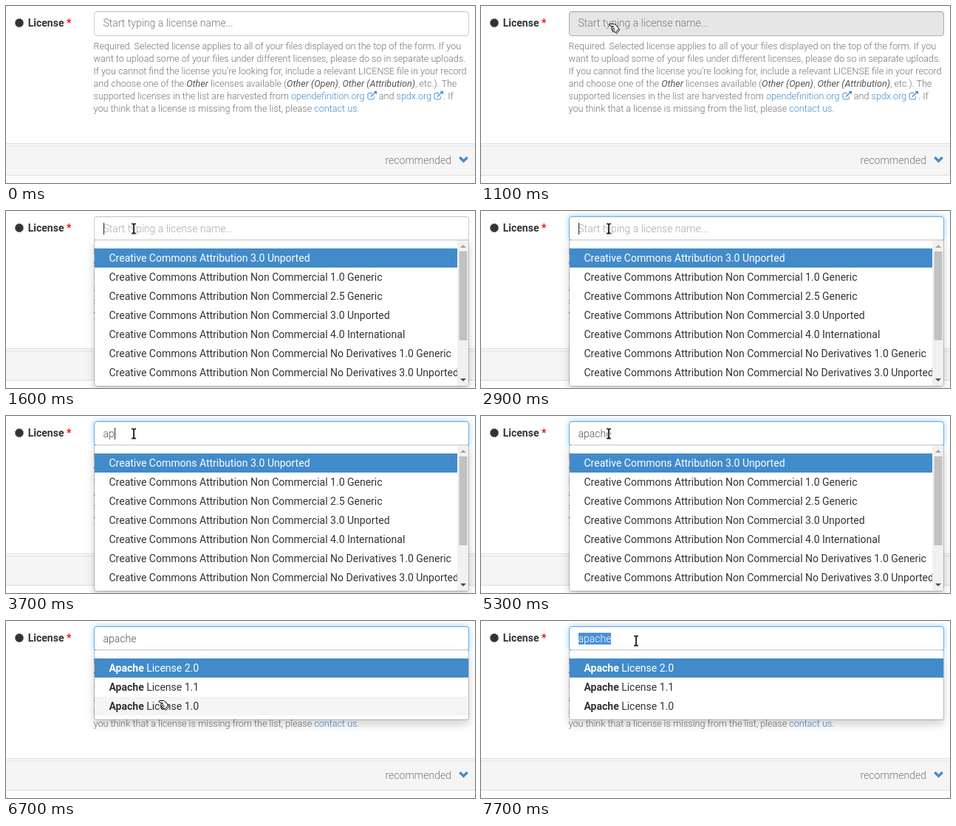
Write an HTML page that moves like this. It is 635x241 px and loops after 8 s.

```html
<!DOCTYPE html>
<html lang="en">
<head>
<meta charset="utf-8">
<title>License picker</title>
<style>
html, body { margin: 0; width: 635px; height: 241px; overflow: hidden; background: #fff; }
body { position: relative; font: 300 14px/20px Roboto, sans-serif; color: #333; }
body > * { position: absolute; box-sizing: border-box; white-space: nowrap; }
svg { display: block; overflow: visible; }
a { color: #428bca; }

/* Every animated part shares one 8 s clock; percent = ms / 80. */
.anim { animation: 8s step-end infinite; }

.label { left: 29.7px; top: 13px; font-weight: 700; }
.label i { color: #f00; font-style: normal; margin-left: 3.5px; }
.help { left: 118.5px; top: 46px; font-size: 12.6px; line-height: 17px; color: #737373; }
.help em { font-weight: 400; color: #555; }
.help svg { display: inline-block; vertical-align: -1px; }
.rule { left: 0; top: 187px; width: 635px; height: 1px; background: #ddd; box-shadow: 0 1px 1px rgba(0,0,0,.05); }
.bar { left: 0; top: 190px; width: 635px; height: 41px; background: #f5f5f5; border: solid #ddd; border-width: 1px 0; }
.more { left: 513.5px; top: 200px; color: #777; }

.box { left: 118.5px; top: 7px; width: 508px; height: 34px; padding: 5px 12px; border: 1px solid #ccc; border-radius: 4px; background: #fff; box-shadow: inset 0 1px 1px rgba(0,0,0,.075); color: #777; }
.button { animation-name: hover; }
.field { padding-top: 6px; opacity: 0; color: #555; animation-name: focus; }
.hint { position: absolute; color: #aaa; animation-name: hint; }
.typed { display: inline-block; height: 16px; line-height: 16px; margin-top: 2px; animation-name: select; }
.typed b { font-weight: 300; opacity: 0; }
.caret { left: 132px; top: 16px; width: 1px; height: 16px; background: #222; opacity: 0; animation-name: caret; }

.menu { left: 118.5px; top: 39px; width: 508px; padding: 11px 0 5px; overflow: hidden; border: 1px solid rgba(0,0,0,.2); border-radius: 0 0 4px 4px; background: #fff padding-box; box-shadow: 0 6px 12px rgba(0,0,0,.175); font-weight: 400; opacity: 0; }
.menu p { margin: 0; padding: 3px 20px; }
.menu p:first-child { background: #428bca; color: #fff; }
.menu b { font-weight: 700; }
.long { height: 200px; padding-right: 15px; animation-name: long; }
.short { animation-name: short; }
.row2 { animation-name: row2; }
.row3 { animation-name: row3; }
.scroll { position: absolute; right: 0; top: 0; }

.hand, .beam { left: 0; top: 0; opacity: 0; }
.hand { animation-name: hand; }
.beam { translate: 169px 16.5px; animation-name: beam; }

@keyframes hover { 10% { background: #e6e6e6; border-color: #adadad; } 18.75% { opacity: 0; } }
@keyframes focus {
  18.75% { opacity: 1; }
  21.25% { opacity: 1; border-color: #9dbfdc; box-shadow: inset 0 1px 1px rgba(0,0,0,.075), 0 0 5px rgba(102,175,233,.3); }
  22.5%, to { opacity: 1; border-color: #66afe9; box-shadow: inset 0 1px 1px rgba(0,0,0,.075), 0 0 8px rgba(102,175,233,.6); }
}
@keyframes hint { 43.75%, to { opacity: 0; } }
@keyframes key1 { 43.75%, to { opacity: 1; } }
@keyframes key2 { 46.25%, to { opacity: 1; } }
@keyframes key3 { 47.5%, to { opacity: 1; } }
@keyframes key4 { 52.5%, to { opacity: 1; } }
@keyframes key5 { 56.25%, to { opacity: 1; } }
@keyframes key6 { 58.75%, to { opacity: 1; } }
@keyframes select { 96.25%, to { background: #4a90d9; color: #fff; } }
@keyframes caret {
  18.75%, 36.25% { opacity: 1; left: 132px; }
  27.5% { opacity: 0; left: 132px; }
  43.75% { opacity: 1; left: 139px; }
  46.25% { opacity: 1; left: 147px; }
  47.5% { opacity: 1; left: 155px; }
  52.5% { opacity: 1; left: 162px; }
  56.25% { opacity: 1; left: 170px; }
  58.75%, 72.5%, 87.5% { opacity: 1; left: 177px; }
  66.25%, 80%, 96.25% { opacity: 0; left: 177px; }
}
@keyframes long { 18.75% { opacity: 1; } 71.25%, to { opacity: 0; } }
@keyframes short { 71.25%, to { opacity: 1; } }
@keyframes row2 { 81.25%, 88.75% { background: #f5f5f5; } 83.75%, 90% { background: #fff; } }
@keyframes row3 { 83.75% { background: #f5f5f5; } 88.75% { background: #fff; } }
@keyframes hand {
  5% { opacity: 1; translate: 0 112px; }
  6.25% { opacity: 1; translate: 62px 92px; }
  7.5% { opacity: 1; translate: 115px 66px; }
  8.75% { opacity: 1; translate: 148px 42px; }
  10% { opacity: 1; translate: 165px 30px; }
  11.25% { opacity: 1; translate: 171px 24px; }
  13.75% { opacity: 1; translate: 173px 23px; }
  18.75% { opacity: 0; translate: 173px 23px; }
  76.25% { opacity: 1; translate: 178px 28px; }
  77.5% { opacity: 1; translate: 183px 42px; }
  78.75% { opacity: 1; translate: 190px 58px; }
  80% { opacity: 1; translate: 198px 76px; }
  81.25% { opacity: 1; translate: 205px 92px; }
  82.5% { opacity: 1; translate: 209px 102px; }
  83.75% { opacity: 1; translate: 206px 107px; }
  85% { opacity: 1; translate: 207px 122px; }
  87.5% { opacity: 1; translate: 207px 108px; }
  88.75% { opacity: 1; translate: 206px 82px; }
  90% { opacity: 1; translate: 205px 52px; }
  91.25%, to { opacity: 0; }
}
@keyframes beam {
  18.75% { opacity: 1; translate: 169px 16.5px; }
  72.5% { opacity: 1; translate: 174px 16.5px; }
  76.25% { opacity: 0; translate: 174px 16.5px; }
  91.25% { opacity: 1; translate: 206px 22.5px; }
  93.75%, to { opacity: 1; translate: 206px 19.5px; }
}
</style>
</head>
<body>
<svg width="0" height="0">
  <symbol id="out" viewBox="0 0 13 12">
    <path d="M7 2.5H2.5Q1 2.5 1 4v5.500Q1 11 2.500 11H8Q9.500 11 9.500 9.500V7.500" fill="none" stroke="#428bca"/>
    <path d="M5 7.500 11 1.500" stroke="#428bca" stroke-width="1.500"/>
    <path d="M8.500 0H13v4.500z" fill="#428bca"/>
  </symbol>
  <path id="ibeam" d="M1 1h1.500Q4 1 4 2.500 4 1 5.500 1H7M4 2v11M1 14h1.500Q4 14 4 12.500 4 14 5.500 14H7"/>
</svg>

<svg style="left:17.5px;top:23px" width="1" height="1" fill="#333">
  <rect id="sq" x="-4.5" y="-4.5" width="9" height="9" rx=".3"/>
  <use href="#sq" transform="rotate(30)"/>
  <use href="#sq" transform="rotate(60)"/>
</svg>
<div class="label">License<i>*</i></div>

<div class="help">Required. Selected license applies to all of your files displayed on the top of the form. If you<br>
want to upload some of your files under different licenses, please do so in separate uploads.<br>
If you cannot find the license you're looking for, include a relevant LICENSE file in your record<br>
and choose one of the <em>Other</em> licenses available (<em>Other (Open)</em>, <em>Other (Attribution)</em>, etc.). The<br>
supported licenses in the list are harvested from <a>opendefinition.org</a> <svg width="13" height="12"><use href="#out"/></svg> and <a>spdx.org</a> <svg width="13" height="12"><use href="#out"/></svg>. If<br>
you think that a license is missing from the list, please <a>contact us</a>.</div>

<div class="rule"></div>
<div class="bar"></div>
<div class="more">recommended</div>
<svg style="left:613px;top:203px" width="13" height="12"><path d="M1.3 3 6.5 8.2 11.7 3" fill="none" stroke="#428bca" stroke-width="3.2"/></svg>

<div class="box button anim">Start typing a license name...</div>
<div class="box field anim"><span class="hint anim">Start typing a license name...</span><span class="typed anim"><b class="anim" style="animation-name:key1">a</b><b class="anim" style="animation-name:key2">p</b><b class="anim" style="animation-name:key3">a</b><b class="anim" style="animation-name:key4">c</b><b class="anim" style="animation-name:key5">h</b><b class="anim" style="animation-name:key6">e</b></span></div>
<div class="caret anim"></div>

<div class="menu long anim">
  <p>Creative Commons Attribution 3.0 Unported</p>
  <p>Creative Commons Attribution Non Commercial 1.0 Generic</p>
  <p>Creative Commons Attribution Non Commercial 2.5 Generic</p>
  <p>Creative Commons Attribution Non Commercial 3.0 Unported</p>
  <p>Creative Commons Attribution Non Commercial 4.0 International</p>
  <p>Creative Commons Attribution Non Commercial No Derivatives 1.0 Generic</p>
  <p>Creative Commons Attribution Non Commercial No Derivatives 3.0 Unported</p>
  <svg class="scroll" width="15" height="198">
    <path fill="#f1f1f1" d="M0 0h15v198H0z"/>
    <path fill="#c1c1c1" d="M2.5 15h11v121h-11z"/>
    <path fill="#a3a3a3" d="M4 10h8L8 6z"/>
    <path fill="#505050" d="M4 188h8l-4 4z"/>
  </svg>
</div>

<div class="menu short anim">
  <p><b>Apache</b> License 2.0</p>
  <p class="row2 anim"><b>Apache</b> License 1.1</p>
  <p class="row3 anim"><b>Apache</b> License 1.0</p>
</div>

<svg class="hand anim" width="16" height="16" stroke="#000" stroke-linejoin="round">
  <path fill="#fff" d="M.5 2.500 2 1.500H7.500L11 4 14.500 9.500 10.500 14.500 8.500 12H5.500L5 10.500 4 8.500 3.500 6.500 6.500 5 2 4z"/>
  <path fill="none" d="M4.500 8.500 8 7M5.500 10.500 8.500 9M9.500 12.500l4-4.500"/>
</svg>
<svg class="beam anim" width="8" height="15" fill="none">
  <use href="#ibeam" stroke="#fff" stroke-width="3"/>
  <use href="#ibeam" stroke="#000" stroke-width="1.600"/>
</svg>
</body>
</html>
```
